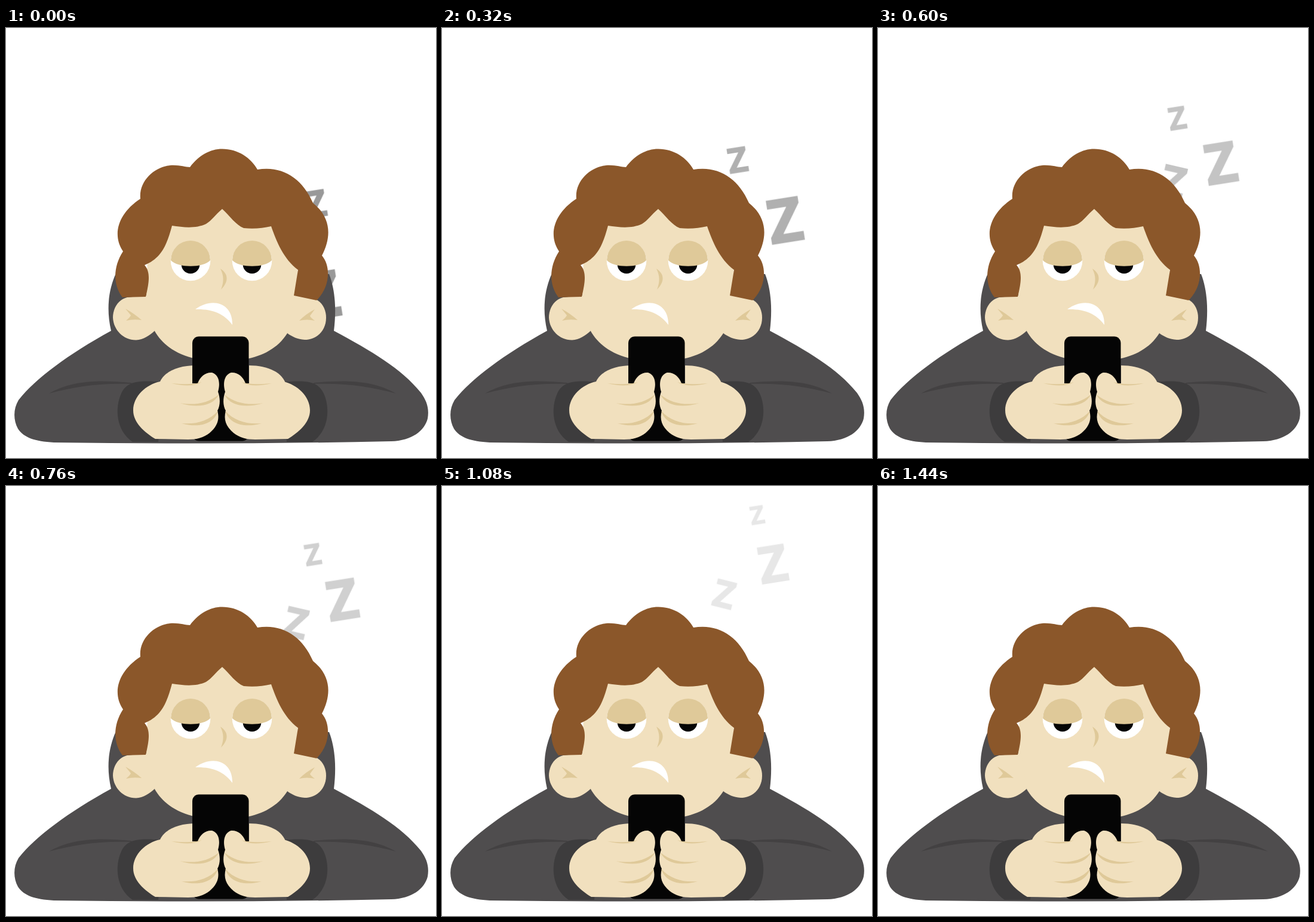
An HTML page for the animation above (1520 ms loop, 720 by 720 pixels).

```html
<!DOCTYPE html>
<html lang="en">
<head>
<meta charset="utf-8">
<title>Sleepy at the phone</title>
<style>
  html, body { margin: 0; width: 100%; height: 100%; overflow: hidden; background: #fff; }
  svg { display: block; width: 100%; height: 100%; }

  .skin { fill: #f1e0be; }
  .shade { fill: #dfc999; }
  .hoodie { fill: #4f4d4e; }
  .cuff { fill: #3d3c3d; }
  .fold { fill: #434142; }
  .hair { fill: #8b572a; }
  .ink { fill: #050505; }
  .white { fill: #fff; }

  .snore { animation: fade 1520ms steps(31) infinite; }
  .snore text {
    font: 700 100px "Open Sans", "Noto Sans", sans-serif;
    text-anchor: middle;
    fill: #999;
    stroke: #999;
    stroke-width: 2.5px;
    animation: 1520ms steps(4) infinite;
  }
  .snore .big { animation-name: big; }
  .snore .small { animation-name: small; }
  .snore .late { animation-name: late; }

  @keyframes fade {
    0% { opacity: 1; }
    81.57% { opacity: .122; }
    81.571%, 100% { opacity: 0; }
  }
  /* Keys are 160 ms apart, so steps(4) moves every 40 ms. */
  @keyframes big {
    0% { transform: translate(528.5px, 447.5px) rotate(-9deg) scale(1.06); }
    10.526% { transform: translate(555.5px, 386.5px) rotate(-9deg) scale(1.02); }
    21.052% { transform: translate(574.5px, 322px) rotate(-9deg) scale(1); }
    31.578% { transform: translate(579.5px, 255px) rotate(-9deg) scale(.955); }
    42.105% { transform: translate(572.5px, 217px) rotate(-9deg) scale(.925); }
    52.631% { transform: translate(560.5px, 182.5px) rotate(-9deg) scale(.9); }
    63.157% { transform: translate(553.5px, 152px) rotate(-9deg) scale(.865); }
    73.684% { transform: translate(554.5px, 123.5px) rotate(-9deg) scale(.825); }
    84.21%, 100% { transform: translate(559px, 101px) rotate(-9deg) scale(.79); }
  }
  @keyframes small {
    0% { transform: translate(519px, 294.5px) rotate(-9deg) scale(.61); }
    10.526% { transform: translate(505px, 258.5px) rotate(-9deg) scale(.605); }
    21.052% { transform: translate(495px, 220.5px) rotate(-9deg) scale(.58); }
    31.578% { transform: translate(493.5px, 180px) rotate(-9deg) scale(.545); }
    42.105% { transform: translate(504px, 142px) rotate(-9deg) scale(.51); }
    52.631% { transform: translate(517px, 105.5px) rotate(-9deg) scale(.475); }
    63.157% { transform: translate(525px, 72px) rotate(-9deg) scale(.445); }
    73.684% { transform: translate(529px, 41.5px) rotate(-9deg) scale(.41); }
    84.21%, 100% { transform: translate(530px, 16px) rotate(-9deg) scale(.37); }
  }
  @keyframes late {
    0% { transform: translate(490px, 470px) rotate(13deg) scale(.85); }
    10.526% { transform: translate(493px, 407px) rotate(13deg) scale(.81); }
    21.052% { transform: translate(496px, 344px) rotate(13deg) scale(.77); }
    31.578% { transform: translate(499px, 280.5px) rotate(13deg) scale(.73); }
    42.105% { transform: translate(493px, 250px) rotate(13deg) scale(.705); }
    52.631% { transform: translate(483px, 223px) rotate(13deg) scale(.67); }
    63.157% { transform: translate(471px, 198px) rotate(14deg) scale(.645); }
    73.684% { transform: translate(473px, 176px) rotate(14deg) scale(.61); }
    84.21%, 100% { transform: translate(479px, 156px) rotate(14deg) scale(.58); }
  }
</style>
</head>
<body>
<svg viewBox="0 0 720 720">
  <defs>
    <g id="eye">
      <circle class="white" r="33.3"/>
      <circle class="ink" cy="6" r="15.300"/>
      <path class="shade" d="M-33 -1A33 33 0 0 1 33 -1C21 12-21 12-33 -1Z"/>
    </g>
    <g id="sleeve">
      <path class="fold" d="M72 612C110 590 155 589 210 594V596C155 594 112 601 72 612Z"/>
      <path class="cuff" d="M262 593C225 590 203 590 193 612C182 636 184 674 212 693H255Z"/>
      <path class="skin" d="M256 598C261 577 286 565 318 565V602Z"/>
    </g>
    <g id="hand">
      <path class="skin" d="M258 592L312 595H321C325 583 335 576 345 577C357 581 359 595 355 609C359 620 359 632 354 641C358 655 354 667 341 678C331 686 319 689 305 689L250 688C232 677 213 661 213 640C213 617 234 597 258 592Z"/>
      <path class="shade" d="M277 595C300 597 313 597 328 593C315 600 298 600 277 595Z"/>
      <path class="shade" d="M291 628C315 632 338 629 356 614C347 633 320 637 291 628Z"/>
      <path class="shade" d="M294 662C318 664 340 658 355 641C348 664 322 670 294 662Z"/>
    </g>
  </defs>

  <g class="snore">
    <text class="late" y="35.700">Z</text>
    <text class="big" y="35.700">Z</text>
    <text class="small" y="35.700">Z</text>
  </g>

  <path class="hoodie" d="M184 411C171 440 168 472 176 507C105 546 49 587 21 623C12 638 12 656 20 671C30 686 48 692 80 694Q360 698 645 692C680 691 701 674 706 654C709 636 704 624 695 611C662 570 612 541 549 507C553 475 552 440 541 412Z"/>

  <path class="skin" d="M235 440C232 535 298 558 362 558C426 558 489 535 488 440L490 300H240Z"/>
  <path class="skin" d="M240 447L203 451C187 455 179 470 179 485C180 506 197 523 218 522.500C230 522 240 515 249 507Z"/>
  <path class="skin" d="M483 446L520 455C531 461 536 473 536 485C536 507 520 522 500 522C488 521 479 517 471 511Z"/>
  <path class="shade" d="M200 470Q216 479 227 489Q213 487 201 490Q208 484 209 481Z"/>
  <path class="shade" d="M517 471Q502 479 491 490Q504 487 517 490Q510 485 509 482Z"/>

  <path class="hair" d="M308 233C323 213 342 202.500 362 202.500C388 202.500 410 217 421 237C462 230 496 251 514 293C545 318 545 350 529 381C545 400 542 435 520 456L482 448L489 405C465 387 453 358 444 332C430 335 415 337 398 335C385 330 375 315 362 303C350 313 345 322 335 328C318 336 298 334 278 331C270 360 262 385 232 397C242 408 240 425 234 450L195 451C179 430 179 400 196 374C177 346 188 310 225 286C222 255 250 232 275 230C290 229 300 233 308 233Z"/>

  <use href="#eye" x="309" y="390"/>
  <use href="#eye" x="412" y="390"/>
  <path class="shade" d="M359 403C373 412 373 425 360 438C365 425 365 415 359 403Z"/>
  <path class="white" d="M317 471C345 450 380 460 379 497C365 478 345 470 317 471Z"/>

  <use href="#sleeve"/>
  <use href="#sleeve" transform="matrix(-1 0 0 1 725 0)"/>
  <rect class="ink" x="312" y="516.500" width="94.500" height="175" rx="11"/>
  <use href="#hand"/>
  <use href="#hand" transform="matrix(-1 0 0 1 722 0)"/>
</svg>
</body>
</html>
```
